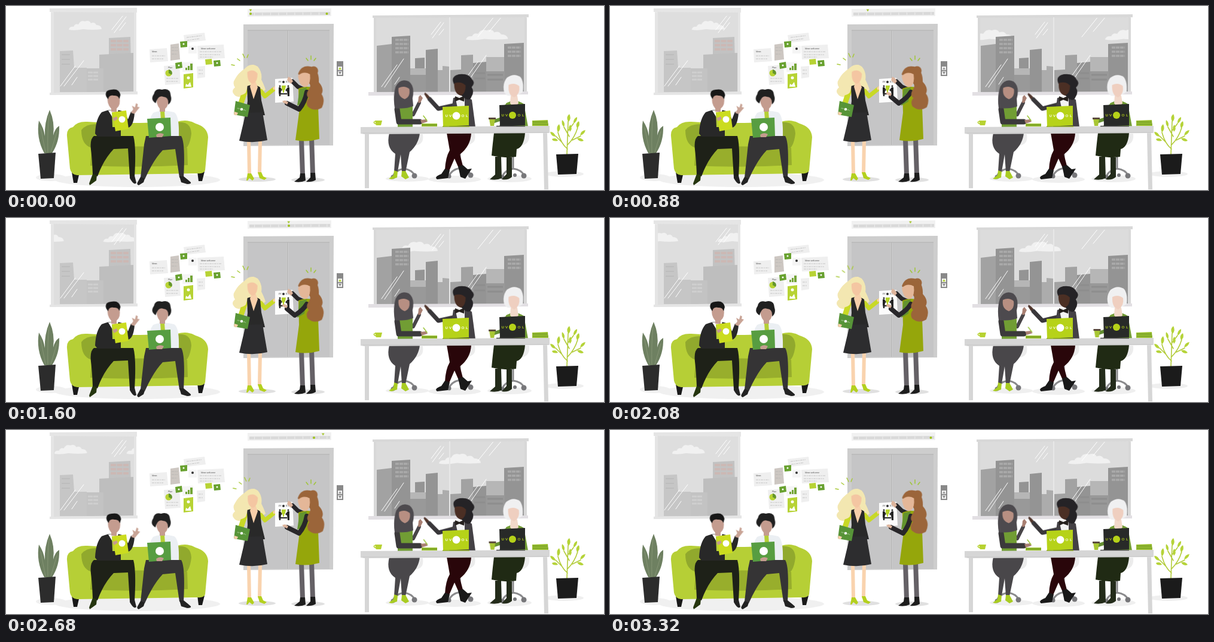
Recreate the animation shown at these times as an HTML page. Size 1000 by 310 pixels, loop 3360 ms.

```html
<!DOCTYPE html>
<html lang="en">
<head>
<meta charset="utf-8">
<title>Office scene</title>
<style>
html, body { margin: 0; width: 100%; height: 100%; overflow: hidden; background: #fff; }
svg { display: block; width: 100vw; height: 100vh; }
text { font-family: Lato, "Open Sans", sans-serif; }
.line { fill: none; stroke-linecap: round; stroke-linejoin: round; }
.anim { animation: 3360ms linear infinite; }
.pivot { transform-box: view-box; }

.cloud-l { animation-name: drift-l; }
.cloud-r { animation-name: drift-r; }
@keyframes drift-l { to { transform: translateX(121px); } }
@keyframes drift-r { to { transform: translateX(224px); } }

.marker { animation-name: travel; }
@keyframes travel {
  0% { transform: none; opacity: 1; animation-timing-function: cubic-bezier(.37, 0, .63, 1); }
  97% { transform: translateX(131px); opacity: 1; }
  97.1%, 100% { transform: translateX(131px); opacity: 0; }
}
.floor { animation-name: lit; animation-delay: calc(var(--i) * 533ms - 3360ms); }
@keyframes lit { 0%, 10% { opacity: 1; } 10.1%, 100% { opacity: 0; } }
.button { animation-name: button; }
@keyframes button {
  0%, 25%, 42%, 66% { fill: #b5d332; }
  25.1%, 41.9%, 66.1%, 100% { fill: #999; }
}

.point { animation-name: point; }
@keyframes point {
  0%, 5%, 77%, 100% { d: path("M503 145Q500 162 490 174L470 164"); }
  14%, 65% { d: path("M503 145Q497 155 483 164L470 153"); }
}
.point-hand { animation-name: point-hand; }
@keyframes point-hand {
  0%, 5%, 77%, 100% { transform: none; }
  14%, 65% { transform: translate(-1px, -14px); }
}
.sparks { animation: sparks 840ms ease-in-out infinite alternate; }
@keyframes sparks { from { transform: none; } to { transform: translate(3px, -1px); } }

.nod { animation: nod 840ms ease-in-out infinite alternate; }
.nod.late { animation-delay: -840ms; }
@keyframes nod { from { transform: rotate(-1.2deg); } to { transform: rotate(1.2deg); } }
.write { animation: write 420ms ease-in-out infinite alternate; }
@keyframes write { to { transform: translate(1.5px, -1px); } }
</style>
</head>
<body>
<svg viewBox="0 0 1000 310" preserveAspectRatio="none">
<defs>
  <clipPath id="pane-l"><path d="M80 11H216V145H80z"/></clipPath>
  <clipPath id="pane-r"><path d="M619 20H868V145H619z"/></clipPath>
  <path id="cloud" d="M0 16Q1 10 8 11Q10 5 16 7Q20-1 27 2Q34-1 37 5Q43 2 46 8Q54 8 55 15Q40 17 24 15Q10 18 0 16z"/>
  <g id="brand" font-size="6" font-weight="700">
    <text x="-18.5" y="2.3">U</text><text x="-12" y="2.3">V</text>
    <text x="8.5" y="2.3">O</text><text x="16" y="2.3">L</text>
  </g>
  <g id="chair">
    <path class="line" d="M0 0V25M-18 38Q-14 28 0 25Q14 27 18 36" stroke="#8a8a8c" stroke-width="3"/>
    <g fill="#77777a"><circle cx="-18" cy="39" r="3.5"/><circle cx="3" cy="36" r="3"/><circle cx="18" cy="37" r="4.5"/></g>
  </g>
</defs>

<!-- Left window -->
<path fill="#dedede" d="M79 10H216V146H79z"/>
<g clip-path="url(#pane-l)">
  <g class="anim cloud-l" fill="#f1f1f1"><use href="#cloud" x="105" y="24"/><use href="#cloud" x="-16" y="24"/></g>
  <path fill="#c6c6c6" d="M90 76L112 75L114 104H135V145H90z"/>
  <path fill="#c2c2c2" d="M172 54L208 52L210 145H172z"/>
  <path fill="#bebebe" d="M156 82L213 79V145H156z"/>
  <path fill="#c3c3c3" d="M135 105H163V145H135z"/>
  <path d="M137 112H154M137 118H154M137 124H154" stroke="#cfcfcf" stroke-width="3" stroke-dasharray="8 1"/>
  <path d="M175 59H205M175 66H205M175 73H205" stroke="#ccb8b4" stroke-width="4" stroke-dasharray="9 1.5"/>
  <path d="M93 82H107M93 90H107M93 98H107" stroke="#bbb" stroke-width="1.5"/>
  <path class="line" d="M177 40L195 17M181 45L201 18M190 41L200 28M91 135L116 101M97 135L130 92M110 133L119 120" stroke="#fff" stroke-width="1"/>
</g>
<path fill="#e5e5e5" d="M73 4L219 3V11L73 10zM75 9H80V147H75zM214 9H218V147H214zM73 146L220 144V149L73 150z"/>

<!-- Right window -->
<path fill="#dcdcdc" d="M618 19H869V146H618z"/>
<g clip-path="url(#pane-r)">
  <g class="anim cloud-r" fill="#f1f1f1">
    <use href="#cloud" transform="translate(769 39) scale(1.28 1.1)"/><use href="#cloud" transform="translate(545 39) scale(1.28 1.1)"/>
  </g>
  <path fill="#a2a2a2" d="M620 67L645 64V145H620zM722 108H743V145H722zM743 108L761 107V83L781 82V145H743z"/>
  <path fill="#b6b6b6" d="M676 105H702V145H676zM803 86H834V145H803z"/>
  <path fill="#949494" d="M645 52L676 50V145H645zM833 64L866 62V145H833zM684 88L700 87V105H684zM702 74L722 72V145H702zM781 96L803 94V145H781z"/>
  <path fill="#acacac" d="M722 108H730V101L741 102V145H722z"/>
  <path fill="#999" d="M803 110H834V145H803zM676 116H702V145H676z"/>
  <path d="M651 57H673M651 64H673M651 71H673M651 78H673M839 70H861M839 77H861M839 84H861" stroke="#aaa" stroke-width="3.5" stroke-dasharray="6 1"/>
  <path d="M783 113H801M805 116H831M783 122H801M805 124H831" stroke="#8e8e8e" stroke-width="3"/>
  <path class="line" d="M711 48L727 27M713 54L732 28M724 49L732 39M789 52L817 17M808 43L829 18M628 136L654 99M633 137L665 89M650 132L658 120M769 122L789 94M774 125L803 83" stroke="#fff"/>
</g>
<path fill="#d8d8d8" d="M613 16L874 14V19L613 20zM615 19H619V147H615zM867 19H871V147H867z"/>
<path d="M742 19V146" stroke="#e8e8e8" stroke-width="2"/>
<path fill="#e2dfe3" d="M606 145L873 144V149L606 151z"/>

<!-- Wall papers -->
<g fill="#efefef">
  <path d="M297 49L332 45L334 58L299 62zM320 67L364 65L366 88L321 90zM240 73L269 71L271 93L241 95zM264 101L290 99L292 131L266 133zM319 102L333 101V120L320 122z"/>
  <path fill="#f5f5f5" d="M305 67H319V80H305zM295 95L313 94V111H295z"/>
  <path fill="#cdc7c2" d="M275 65L289 63L291 90L275 92z"/>
  <path fill="#68a12f" d="M291 60L303 59V69L292 70zM283 96L294 94L295 104L284 106zM347 92L358 91L359 101L348 102z"/>
  <path fill="#b7d334" d="M333 90L344 89L345 98L334 99zM297 115L313 113V137L297 139z"/>
</g>
<path d="M302 53L327 50M303 58L324 55M324 77H361M324 82H358M324 86H346M244 84H266M244 89H263M277 70H287M277 75H287M277 81H286M268 122H288M268 127H287M322 108H330M322 114H330" stroke="#aaa" stroke-width=".6" stroke-dasharray="4 1 2 1"/>
<g font-size="4" font-style="italic" fill="#555"><text x="326" y="73">Ideas welcome</text><text x="244" y="78">Ideas</text><text x="271" y="105">Plan</text></g>
<path fill="#73a536" d="M300 104H303V108H300zM304 101H307V108H304zM308 97H312V108H308z"/>
<circle cx="272" cy="113" r="5.5" fill="#b7d334"/><path fill="#64952e" d="M272 113V107A6 6 0 0 1 277 116z"/>
<circle cx="312" cy="72" r="2" fill="#333"/>
<g fill="#fff"><circle cx="305" cy="121" r="2.5"/><path d="M300 136L301 131L304 133L308 128L310 136z"/><circle cx="297" cy="64" r="1.5"/><circle cx="289" cy="100" r="1.5"/><circle cx="353" cy="96" r="1.5"/></g>

<!-- Left plant and sofa -->
<g fill="#f0f0f0"><ellipse cx="75" cy="289" rx="25" ry="6"/><ellipse cx="220" cy="293" rx="138" ry="12"/></g>
<path fill="#6e8061" d="M64 248Q50 222 55 193Q63 205 65 219Q64 196 73 175Q82 196 79 218Q82 206 89 202Q90 228 77 248z"/>
<path class="line" d="M70 247Q69 210 72 184M66 246L58 205M75 246L85 212" stroke="#8b9a79" stroke-width=".8"/>
<path fill="#2c2c2c" d="M54 249L83 247L80 290L58 291z"/>
<path fill="#191919" d="M110 280H123L119 298H113zM320 279H332L328 295H322z"/>
<path fill="#b6cf36" d="M102 219Q101 206 112 204Q119 194 136 195Q200 199 286 195Q304 190 317 198Q337 204 338 221L333 277Q331 283 320 282L119 285Q109 284 107 274z"/>
<path fill="#91a92d" d="M126 209Q134 198 153 199V240L143 239Q126 234 126 209zM286 196Q309 193 310 215Q308 234 300 241H286z"/>
<path fill="#98ae2c" d="M143 239Q220 234 303 239L304 268Q220 273 141 269z"/>

<!-- Seated men -->
<g fill="#1e2118">
  <path d="M147 219H213Q218 236 215 288H207L204 240L180 241Q163 259 153 287L145 284Q144 257 142 242Q140 224 147 219z"/>
  <path fill="#25350f" d="M145 283L152 285L151 294L140 302L139 299z"/>
  <path fill="#222" d="M207 286H215L218 298Q214 303 207 290z"/>
</g>
<path fill="#353435" d="M234 219H293Q300 230 297 289H290L283 241L262 243Q246 260 232 292L225 289Q229 253 231 233z"/>
<path fill="#222" d="M225 288L232 291L230 297L222 302Q218 301 220 297zM290 287H297L308 296Q312 300 303 300L293 297z"/>
<path fill="#282828" d="M160 179Q178 171 198 178L204 191L209 178L215 181Q213 203 204 205L192 196V220H153L149 215Q150 190 160 179z"/>
<path fill="#fff" d="M171 176L188 174L183 196z"/><path fill="#b5cf36" d="M177 179H182L183 204H178z"/>
<g class="nod pivot" style="transform-origin:180px 177px">
  <path fill="#c49c8f" d="M171 152Q180 146 190 152Q193 167 185 173V179L176 178V173Q168 164 171 152z"/>
  <path fill="#171717" d="M168 152Q165 142 176 141Q190 138 192 150L190 157Q188 150 181 151Q173 149 171 157z"/>
</g>
<g class="nod pivot" style="transform-origin:205px 190px"><path fill="#c9a496" d="M209 180L213 174L211 168L216 171L218 164L221 166L220 170L224 171L219 177L215 182z"/></g>
<path fill="#cbdc1f" d="M178 179L201 176L205 207L183 211z"/><circle cx="194" cy="191" r="5.5" fill="#fff"/>
<path fill="#c49c8f" d="M178 189L185 186L187 190L181 194z"/>
<path fill="#ebeff3" d="M246 180Q261 174 281 179Q290 184 289 219H240Q235 195 246 180z"/>
<path fill="#b5cf36" d="M258 177H265L266 192H259z"/>
<g class="nod late pivot" style="transform-origin:261px 177px">
  <path fill="#c49c8f" d="M252 153Q261 146 271 153Q273 167 266 173V178H257V173Q250 165 252 153z"/>
  <path fill="#202020" d="M250 164Q240 158 247 148Q249 138 260 141Q274 137 275 151Q278 160 271 166Q272 153 263 153Q254 149 250 164z"/>
</g>
<path fill="#579d41" d="M236 190L275 188L276 219L239 222z"/><circle cx="257" cy="204" r="7" fill="#fff"/>
<path fill="#c49c8f" d="M251 217Q257 212 264 216L261 221H252z"/>

<!-- Lift -->
<path fill="#cdcdcd" d="M397 31L548 30L547 235L397 236z"/>
<path fill="#c5c5c6" d="M404 41H469V234H404zM472 41H541V234H472z"/>
<path d="M470.5 41V234M404 41H541" stroke="#b0b0b0"/>
<path fill="#f1f1f1" d="M404 5L544 4V17L404 18z"/>
<path d="M407 13.5L542 12.5" stroke="#d9d9d9" stroke-width="5"/>
<path d="M415 13.5L542 12.5" stroke="#f4f4f4" stroke-width="4" stroke-dasharray=".8 12.7"/>
<path class="anim marker" fill="#a3c428" d="M406.8 5.5H411.2L409 9.5z"/>
<g fill="#9fc31b">
  <circle class="anim floor" style="--i:0" cx="409" cy="13" r="2"/><circle class="anim floor" style="--i:1" cx="428.5" cy="13" r="2"/>
  <circle class="anim floor" style="--i:2" cx="450" cy="13" r="2"/><circle class="anim floor" style="--i:3" cx="473" cy="13" r="2"/>
  <circle class="anim floor" style="--i:4" cx="493" cy="13" r="2"/><circle class="anim floor" style="--i:5" cx="515" cy="13" r="2"/>
  <circle class="anim floor" style="--i:6" cx="536.5" cy="13" r="2"/>
</g>
<path fill="#898989" d="M553 93H564V118H553z"/><path fill="#f2f2f2" d="M555 102H562V108H555zM555 110H562V116H555z"/>
<path class="anim button" d="M558.5 103L561 107H556z"/><path fill="#888" d="M556 111H561L558.5 115z"/>

<!-- Blonde colleague -->
<g fill="#e0e0e0"><ellipse cx="420" cy="292" rx="31" ry="4"/><ellipse cx="505" cy="293" rx="28" ry="4"/></g>
<path class="line" d="M406 226L407 283M425 226L424 281" stroke="#f9d3ae" stroke-width="6"/>
<path fill="#b4d01e" d="M404 282H410L415 291L412 294L407 290L404 294H402zM421 280H427L430 287L436 290L432 293L424 290z"/>
<g class="line sparks" stroke="#a7c936" stroke-width="1.5"><path d="M377 99L382 100M387 89L391 92M396 81L399 87M405 82L403 87"/></g>
<path fill="#f3e7b1" d="M400 105Q410 96 421 102Q429 112 427 124Q432 134 434 141Q428 146 422 147L398 152Q385 156 380 147Q377 142 383 137Q378 130 383 123Q388 113 400 105z"/>
<path class="line" d="M426 143L433 152L448 140" stroke="#c8d926" stroke-width="7"/>
<path class="line" d="M400 142L391 170" stroke="#c8d926" stroke-width="9"/>
<path fill="#292929" d="M403 135Q415 130 425 137L427 159L433 184L401 185L404 160z"/>
<path fill="#2d2d2f" d="M401 180L429 179L437 226Q414 232 390 227z"/>
<path fill="#f7cfaa" d="M411 126H417L421 137L414 157L408 136zM446 138L451 134L453 137L448 142z"/>
<g class="nod pivot" style="transform-origin:412px 131px">
  <path fill="#f3e7b1" d="M397 112Q402 98 415 99Q429 105 426 127L400 130z"/>
  <path fill="#f4c6a2" d="M404 111Q414 105 421 114Q421 128 413 131Q403 129 404 111z"/>
</g>
<path fill="#f3e7b1" d="M402 120Q406 135 401 146Q394 153 382 149Q388 145 390 126z"/>
<path fill="#579438" d="M384 160L408 167L404 187L381 183z"/>
<use href="#brand" transform="translate(394 174) rotate(14) scale(.4)" fill="#fff"/><circle cx="394" cy="174" r="2.3" fill="#fff"/>
<path fill="#f7cfaa" d="M382 178L388 180L386 184L381 183z"/>

<!-- Poster and brunette colleague -->
<path fill="#fcfcfc" d="M450 123L479 121L481 161L450 163z"/>
<use href="#brand" transform="translate(464 128) scale(.45)" fill="#444"/>
<circle cx="464" cy="128" r="2" fill="#333"/>
<g fill="#252525"><circle cx="458" cy="135" r="1.5"/><circle cx="472" cy="135" r="1.5"/><path d="M456 137H459L462 142L460 143L459 152H457L456 146zM471 137H474L474 152H471L470 144L467 142zM459 147H470V149H459z"/></g>
<path fill="#b6d329" d="M461 134H468L467 140L465 143V146H463V143L461 140z"/>
<path class="line" d="M494 224L496 285M511 222L513 284" stroke="#656166" stroke-width="8"/>
<path fill="#1d1d1d" d="M492 282H500L501 294Q493 298 482 296L491 289zM509 281H517L518 293Q511 297 502 296L509 289z"/>
<path class="line" d="M499 141L488 136L479 127" stroke="#29272a" stroke-width="7"/>
<path fill="#ddb49c" d="M476 131L470 125L472 119L477 122L480 127z"/>
<path fill="#95a60b" d="M489 139Q506 132 521 142L524 224Q504 230 484 226L490 180Z"/>
<path fill="#63932e" d="M491 140L503 137L499 161L487 168z"/>
<path class="line anim point" d="M503 145Q500 162 490 174L470 164" stroke="#29272a" stroke-width="8"/>
<path class="anim point-hand" fill="#ddb49c" d="M470 166L464 163L462 160L467 159L472 162z"/>
<g class="line" stroke="#9fc636" stroke-width="1.5"><path d="M502 88L505 92M510 84V90M518 88L515 92"/></g>
<g class="nod late pivot" style="transform-origin:507px 132px">
  <circle cx="514" cy="109" r="7.5" fill="#9b653a"/>
  <path fill="#9b653a" d="M488 115Q493 99 509 102Q524 108 523 128Q533 139 528 148Q535 158 529 171Q516 179 505 169Q501 161 507 155Q500 150 507 140Q512 132 503 127z"/>
  <path fill="#e4b798" d="M488 118Q497 109 508 115Q510 130 503 136Q491 138 488 118z"/>
</g>

<!-- Legs and chairs behind the table -->
<g fill="#efefef"><ellipse cx="671" cy="291" rx="36" ry="5"/><ellipse cx="750" cy="292" rx="44" ry="6"/><ellipse cx="842" cy="291" rx="37" ry="6"/><ellipse cx="934" cy="283" rx="32" ry="5"/></g>
<path fill="#ececec" d="M671 216H697Q700 235 682 235H667zM758 215H784Q788 234 767 234zM849 215H875Q877 235 858 235z"/>
<use href="#chair" x="665" y="249"/><use href="#chair" x="759" y="248"/><use href="#chair" x="848" y="249"/>
<path fill="#49474a" d="M641 214H692Q690 233 675 246L668 280H662L660 250L655 279H649L651 249Q635 239 641 214z"/>
<path fill="#a9cc22" d="M649 277L655 279L654 289L645 292L640 291L648 285zM662 278H668L674 289L668 292L661 287z"/>
<path fill="#29060a" d="M737 214H778Q777 236 759 250L765 273H757L750 257L741 278L734 276Q735 255 742 243z"/>
<path fill="#191919" d="M734 274L742 277L739 290L721 292Q715 288 728 283zM756 270L764 268L772 275L779 274L768 291L760 288z"/>
<path fill="#202a14" d="M816 214H868Q866 238 854 241L853 254Q833 257 812 252Q814 230 816 214z"/>
<path fill="#232b1a" d="M818 254H828L829 290Q821 294 809 292L818 284zM837 255H846V288Q839 294 829 292L837 283z"/>

<!-- Women at the table -->
<path class="line" d="M681 183L691 163" stroke="#494649" stroke-width="6"/>
<path fill="#a98073" d="M689 163L690 153L693 150L697 155L693 163z"/>
<path fill="#719d34" d="M655 169Q667 161 680 168V204H655z"/>
<path class="line" d="M654 174L657 195L692 195" stroke="#3b393b" stroke-width="9"/>
<g class="nod pivot" style="transform-origin:665px 165px">
  <path fill="#4d4a4e" d="M650 172Q647 152 652 136Q660 121 674 127Q685 135 680 156L681 169Q668 174 650 172z"/>
  <path fill="#b78f82" d="M657 138Q667 133 675 140Q677 153 667 157Q655 153 657 138z"/>
</g>
<g class="write"><path fill="#a98073" d="M693 192L702 191L705 195L695 198z"/><path class="line" d="M698 185L704 193" stroke="#9ac436" stroke-width="1.5"/></g>
<g class="nod late pivot" style="transform-origin:720px 172px">
  <path class="line" d="M752 166L723 173L708 157" stroke="#39373a" stroke-width="7"/>
  <path fill="#51362c" d="M704 157L699 149L700 146L704 149L708 153z"/>
</g>
<path fill="#444145" d="M748 155Q764 148 779 158L785 204H741z"/>
<path fill="#f3f3f3" d="M751 153L767 151L767 171L755 171z"/><path fill="#25201d" d="M751 152L758 155L767 151L766 161L758 158L751 161z"/>
<g class="nod pivot" style="transform-origin:762px 153px">
  <path fill="#252326" d="M749 130Q744 118 758 115Q775 113 780 124Q786 129 779 137Q784 145 778 154Q776 160 769 157L758 148z"/>
  <path fill="#4b2f24" d="M750 130Q762 126 769 134Q769 147 761 151Q749 148 750 130z"/>
</g>
<path fill="#739d36" d="M836 164Q851 155 866 165L873 203H825z"/>
<path class="line" d="M836 169L829 190L817 194" stroke="#648f32" stroke-width="6"/>
<path fill="#f2d9ca" d="M844 151H855L857 164L850 172L843 164z"/>
<g class="nod late pivot" style="transform-origin:849px 155px">
  <path fill="#f0f0f1" d="M833 146Q829 131 837 121Q849 112 860 120Q866 128 864 145Q853 153 838 151z"/>
  <path fill="#efcfc0" d="M840 133Q850 128 858 135Q860 148 850 154Q839 151 840 133z"/>
</g>

<!-- Table and objects -->
<path fill="#d6d6d6" d="M593 204L909 202V214L607 216V307H600V216L593 215zM898 213H905L907 309H900z"/>
<path d="M596 214L906 213" stroke="#c8c8c8"/>
<path fill="#b7d232" d="M617 193H629L627 201H619z"/><path class="line" d="M618 194Q612 196 619 199" stroke="#b7d232" stroke-width="1.5"/>
<path fill="#9ac02f" d="M695 198H721V203H695zM880 193L906 192L907 202H880z"/>
<path d="M696 200.5H721M881 195.5H906M881 199H907" stroke="#628b27"/>
<path fill="#b6d219" d="M730 170L774 168V201L731 203z"/><path d="M730 203H775" stroke="#91ac1c" stroke-width="1.5"/>
<use href="#brand" transform="translate(753 185)" fill="#fff"/><circle cx="753" cy="185" r="6.5" fill="#fff"/>
<path fill="#282a28" d="M825 167L868 165V201L826 203z"/><path d="M820 202.5H868" stroke="#4b4b4b" stroke-width="1.5"/>
<use href="#brand" transform="translate(847 184)" fill="#b6d219"/><circle cx="847" cy="184" r="6" fill="#b6d219"/>
<g class="write"><path fill="#a8c633" d="M808 190H818L816 202H810z"/><path fill="#5a4a3c" d="M807 188H819V191H807z"/></g>

<!-- Right plant -->
<g class="line" stroke="#b2cb3a" stroke-width="1.6"><path d="M938 250L940 194M939 241Q928 232 923 213M939 234Q951 222 956 205M930 230L919 219M942 220L933 204M947 226L961 219M940 210L949 198"/></g>
<g fill="#b5d338">
  <path d="M941 195Q935 188 942 182Q946 189 941 195zM923 213Q919 204 925 199Q929 207 923 213zM955 206Q951 198 958 194Q961 201 955 206zM919 220Q911 219 910 212Q917 212 919 220zM933 204Q928 199 930 192Q936 197 933 204zM949 198Q948 190 955 187Q956 194 949 198z"/>
  <path d="M960 218Q961 210 969 209Q967 217 960 218zM923 227Q914 229 913 224Q920 221 923 227zM955 223Q959 230 966 227Q962 221 955 223zM943 212Q939 203 944 200Q948 207 943 212z"/>
</g>
<path fill="#1b1b1b" d="M920 250L957 249L954 283L923 284z"/>
</svg>
</body>
</html>
```
